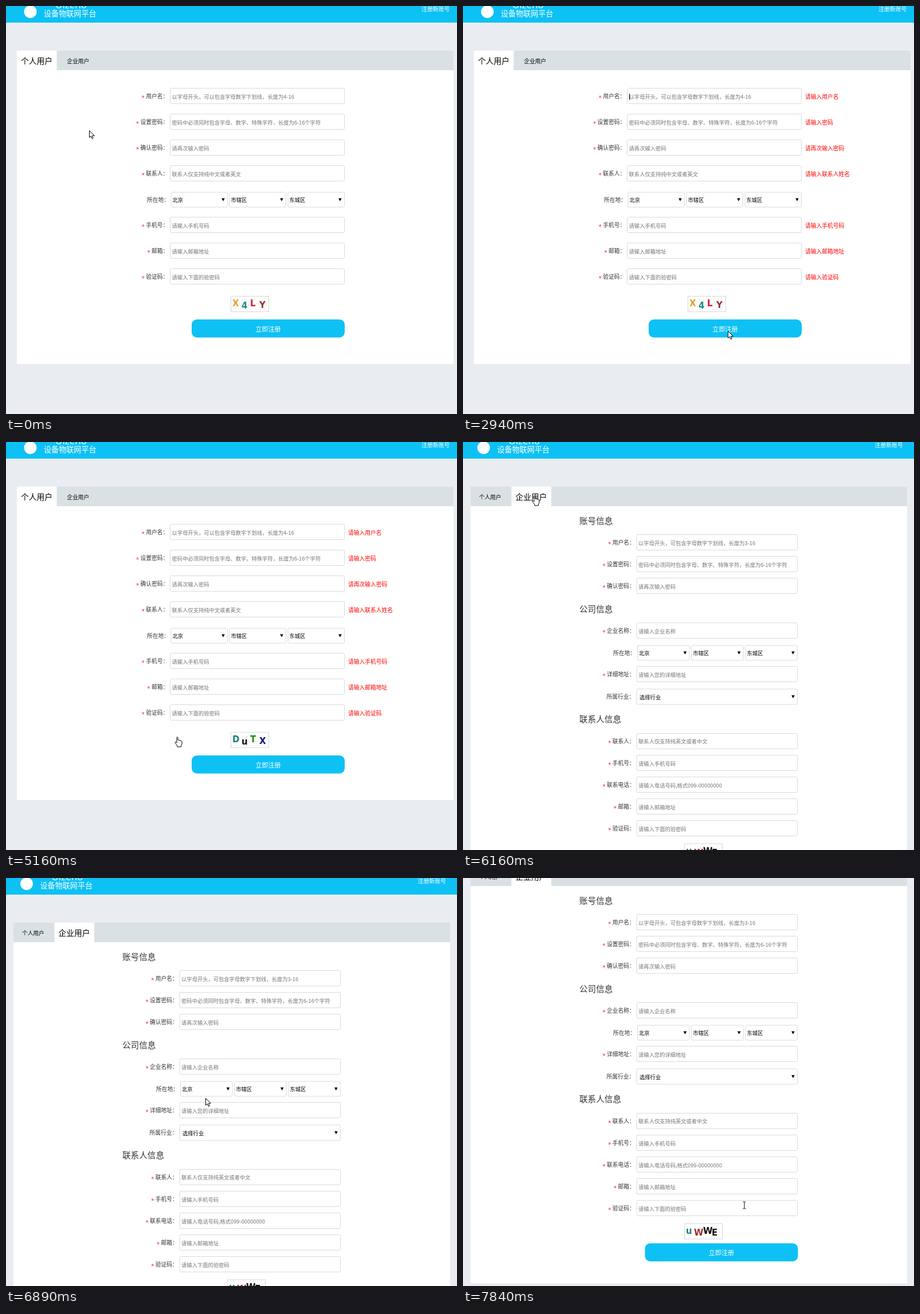
An HTML page with a canvas that plays this animation: 787x712 px, repeating every 7.99 s.

```html
<!DOCTYPE html>
<html lang="zh-CN">
<head>
<meta charset="utf-8">
<style>
html, body { margin: 0; width: 100%; height: 100%; overflow: hidden; background: #e9edf1; }
canvas { display: block; }
</style>
</head>
<body>
<canvas id="stage" width="787" height="712"></canvas>
<script>
const ctx = document.getElementById('stage').getContext('2d');
const LOOP = 7990, BLUE = '#0dc1f5', LINE = '#d6dae0';
const CJK = '"Noto Sans CJK SC", "Noto Sans CJK", sans-serif';
const REGION = ['北京', '市辖区', '东城区'];

// y is the vertical middle of the glyphs
function text(str, x, y, size, color, align = 'left') {
  ctx.font = `${size}px ${CJK}`;
  ctx.textAlign = align;
  ctx.fillStyle = color;
  ctx.fillText(str, x, y + size * 0.38);
}

function rect(x, y, w, h, color) {
  ctx.fillStyle = color;
  ctx.fillRect(x, y, w, h);
}

function box(x, y, w, h) {
  ctx.beginPath();
  ctx.roundRect(x + 0.5, y + 0.5, w - 1, h - 1, 2);
  ctx.fillStyle = '#fff';
  ctx.fill();
  ctx.lineWidth = 1;
  ctx.strokeStyle = LINE;
  ctx.stroke();
}

function label(str, right, y, required) {
  const x = right - str.length * 9.75;
  text(str, x, y, 9.75, '#333');
  if (!required) return;
  ctx.font = '13px "Liberation Sans", sans-serif';
  ctx.fillStyle = '#f33';
  ctx.fillText('*', x - 7.5, y + 7.5);
}

function select(x, y, w, h, str, pad) {
  box(x, y, w, h);
  const mid = y + h / 2, tip = x + w - 8;
  text(str, x + pad, mid + 0.5, 9.3, '#000');
  ctx.beginPath();
  ctx.moveTo(tip - 2.8, mid - 2.6);
  ctx.lineTo(tip + 2.8, mid - 2.6);
  ctx.lineTo(tip, mid + 2.8);
  ctx.fill();
}

function regions(x, y, w, step) {
  REGION.forEach((name, i) => select(x + i * step, y, w, 27, name, 3));
}

function field(x, w, y, name, hint) {
  label(name, x - 2.7, y, true);
  box(x, Math.round(y - 14.5), w, 28);
  text(hint, x + 3.6, y + 0.8, 9.27, '#757575');
}

function button(x, y) {
  ctx.beginPath();
  ctx.roundRect(x, y, 267, 31.5, 9);
  ctx.fillStyle = BLUE;
  ctx.fill();
  text('立即注册', x + 133.5, y + 16.3, 11.1, '#fff', 'center');
}

// glyphs: [letter, x, baseline, color]
function captcha(x, y, glyphs) {
  rect(x, y, 67, 28, '#d8d8d8');
  rect(x + 1, y + 1, 65, 26, '#fff');
  let seed = 7;
  const rnd = () => (seed = seed * 16807 % 2147483647) / 2147483647;
  for (let i = 0; i < 50; i++) rect(x + 1 + rnd() * 64, y + 1 + rnd() * 25, 1, 1, '#ccc');
  ctx.font = 'bold 15px "DejaVu Sans", sans-serif';
  ctx.textAlign = 'left';
  for (const [ch, gx, gy, color] of glyphs) {
    ctx.fillStyle = color;
    ctx.fillText(ch, x + gx, y + gy);
  }
}

function header(dx) {
  rect(0, 0, 787, 29, BLUE);
  ctx.fillStyle = '#fff';
  ctx.beginPath();
  ctx.arc(42.5 + dx, 10, 11, 0, 7);
  ctx.fill();
  ctx.font = '17px "Open Sans", sans-serif';
  ctx.textAlign = 'left';
  ctx.fillText('Ulzeno', 86 + dx, 4);
  text('设备物联网平台', 66 + dx, 13.5, 13.1, '#fff');
  text('注册新账号', 725 + dx, 5, 9.9, '#fff');
}

function card(x, bottom, tabX, tabW) {
  rect(x, 78, 762, bottom - 78, '#fff');
  rect(x, 78, 762, 34, '#dae1e4');
  rect(tabX, 78, tabW, 34, '#fff');
}

const PERSONAL = [
  [157.5, '用户名：', '以字母开头，可以包含字母数字下划线，长度为4-16', '请输入用户名'],
  [202.5, '设置密码：', '密码中必须同时包含字母、数字、特殊字符，长度为6-16个字符', '请输入密码'],
  [247.5, '确认密码：', '请再次输入密码', '请再次输入密码'],
  [292.5, '联系人：', '联系人仅支持纯中文或者英文', '请输入联系人姓名'],
  [382.5, '手机号：', '请输入手机号码', '请输入手机号码'],
  [427.5, '邮箱：', '请输入邮箱地址', '请输入邮箱地址'],
  [472.5, '验证码：', '请输入下面的验密码', '请输入验证码']
];

const COMPANY = [
  [175.5, '用户名：', '以字母开头，可包含字母数字下划线，长度为3-16'],
  [213.5, '设置密码：', '密码中必须同时包含字母、数字、特殊字符，长度为6-16个字符'],
  [251.5, '确认密码：', '请再次输入密码'],
  [329.5, '企业名称：', '请输入企业名称'],
  [405.5, '详细地址：', '请输入您的详细地址'],
  [522, '联系人：', '联系人仅支持纯英文或者中文'],
  [560.5, '手机号：', '请输入手机号码'],
  [598.5, '联系电话：', '请输入电话号码,格式099-00000000'],
  [636.5, '邮箱：', '请输入邮箱地址'],
  [674.5, '验证码：', '请输入下面的验密码']
];

const CODES = [
  [['X', 3, 18, '#e8a020'], ['4', 19, 22, '#1a8c8c'], ['L', 34, 18, '#dc143c'], ['Y', 50, 21, '#a03030']],
  [['D', 3, 18, '#1a8080'], ['u', 19, 22, '#111'], ['T', 34, 18, '#1c8a1c'], ['X', 50, 21, '#14147c']],
  [['u', 3, 18, '#1a8080'], ['W', 17, 21, '#a03030'], ['W', 33, 18, '#111'], ['E', 48, 21, '#111']]
];

function personalPage(t) {
  header(0);
  card(19, 625, 19, 69.5);
  text('个人用户', 26, 95.5, 13.75, '#000');
  text('企业用户', 106.5, 96.5, 9.7, '#000');
  for (const [y, name, hint, error] of PERSONAL) {
    field(286, 305, y, name, hint);
    if (t >= 2940) text(error, 597, y + 0.5, 9.75, '#f00');
  }
  label('所在地：', 285, 338);
  regions(287.5, 324.5, 99.5, 102);
  captcha(392, 506, CODES[t < 4860 ? 0 : 1]);
  button(324, 547);
  if (t >= 2940 && t < 3550) rect(290, 153, 1, 11, '#000');
}

function companyPage() {
  header(-6.5);
  card(13, 805, 84.5, 69.5);
  text('个人用户', 28, 96.5, 9.7, '#000');
  text('企业用户', 91.5, 95.5, 13.75, '#000');
  text('账号信息', 203, 137, 14.6, '#333');
  text('公司信息', 203, 291, 14.6, '#333');
  text('联系人信息', 203, 483.5, 14.6, '#333');
  for (const row of COMPANY) field(302.5, 281.5, ...row);
  label('所在地：', 301, 368);
  regions(304, 354.5, 91.5, 94.2);
  label('所属行业：', 299.2, 444);
  select(302.5, 430.5, 281.5, 28, '选择行业', 5.5);
  captcha(386, 700.5, CODES[2]);
  button(317.5, 735.5);
}

// Pointer stops: time, x, y, shape (default arrow)
const STOPS = [
  [0, 145, 217], [400, 136, 211], [540, 127, 205], [670, 170, 235], [810, 260, 300],
  [950, 370, 360], [1080, 414, 386], [1220, 390, 350], [1360, 345, 275],
  [1510, 320, 215], [1660, 335, 175], [1780, 345, 159, 'beam'],
  [1930, 390, 230], [2080, 490, 360], [2230, 560, 490], [2380, 500, 573],
  [2530, 461, 566], [2660, 462, 567],
  [3550, 480, 555], [3700, 510, 530], [3830, 534, 505], [3980, 541, 495],
  [4120, 522, 498], [4260, 485, 510], [4400, 445, 517, 'hand'], [4550, 425, 519, 'hand'],
  [5010, 370, 518, 'hand'], [5160, 295, 514, 'hand'],
  [5280, 245, 440], [5430, 195, 330], [5570, 158, 235], [5710, 138, 172], [5850, 131, 135],
  [6010, 124, 98, 'hand'], [6160, 121, 93, 'hand'],
  [6460, 150, 140], [6600, 230, 240], [6740, 310, 345], [6890, 348, 384],
  [7720, 430, 478], [7840, 491, 571, 'beam']
];

const SHAPES = {
  arrow: 'M.5 .5V12.5L3.3 10L5.2 14.5L7.2 13.7L5.3 9.3H9.2Z',
  hand: 'M3 11V1.5Q4 -.5 5 1.5V6L8 6.5L11 7.5L12 9V13L10.5 16V18H4V16L.5 11.5Q-.5 9 1.5 9.5Z',
  beam: 'M-2.5 -6H-.5L0 -5.5L.5 -6H2.5M0 -5.5V5.5M-2.5 6H-.5L0 5.5L.5 6H2.5'
};
for (const name in SHAPES) SHAPES[name] = new Path2D(SHAPES[name]);

function pointer(t) {
  const [, x, y, name = 'arrow'] = STOPS.findLast(stop => stop[0] <= t);
  ctx.save();
  ctx.translate(x, y);
  ctx.lineWidth = 1;
  ctx.strokeStyle = '#000';
  ctx.fillStyle = '#fff';
  if (name !== 'beam') ctx.fill(SHAPES[name]);
  ctx.stroke(SHAPES[name]);
  ctx.restore();
}

function draw(now) {
  const t = now % LOOP;
  const scroll = t < 7170 ? 0 : t < 7320 ? 38.5 : 98;
  rect(0, 0, 787, 712, '#e9edf1');
  ctx.save();
  ctx.translate(0, -scroll);
  if (t < 6010) personalPage(t);
  else companyPage();
  ctx.restore();
  pointer(t);
}

let start;
function tick(now) {
  start ??= now;
  draw(now - start);
  requestAnimationFrame(tick);
}
requestAnimationFrame(tick);
</script>
</body>
</html>
```
